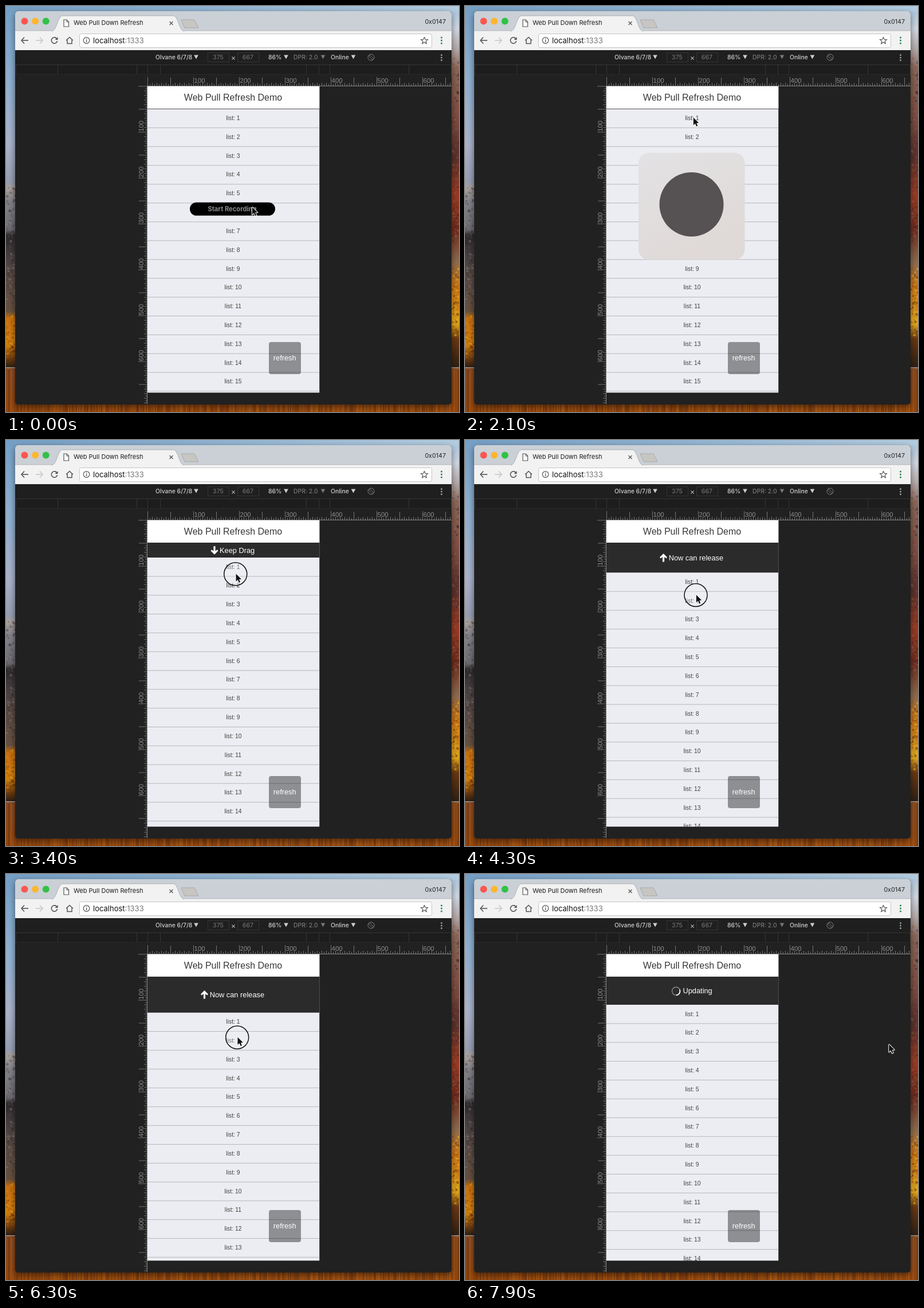
These frames come from a looping animation (791 px wide and 708 px high, 8 s). An HTML page with a canvas:

```html
<!DOCTYPE html>
<html lang="en">
<head>
<meta charset="utf-8">
<title>Web Pull Down Refresh</title>
<style>
html, body { margin: 0; width: 100%; height: 100%; overflow: hidden; background: #212121; }
canvas { display: block; width: 791px; height: 708px; }
</style>
</head>
<body>
<canvas id="stage" width="791" height="708"></canvas>
<script>
const W = 791, H = 708, LOOP = 8000, STEP = 100;
const PAGE = { x: 247, y: 139.5, w: 300.5, bottom: 674.5, list: 179.5, row: 32.82 };
const PRESS = 2600, RELEASE = 6700, REST = 48.5;
const UI = 'Inter, Roboto, sans-serif', SANS = '"Liberation Sans", Arial, sans-serif';

const view = document.getElementById('stage').getContext('2d');
const backdrop = document.createElement('canvas');
backdrop.width = W;
backdrop.height = H;
let g = backdrop.getContext('2d');

let seed = 7;
const rand = () => (seed = (seed * 16807) % 2147483647) / 2147483647;
const smooth = p => p * p * (3 - 2 * p);
const clamp = p => Math.max(0, Math.min(1, p));

function rect(x, y, w, h, fill) {
  g.fillStyle = fill;
  g.fillRect(x, y, w, h);
}

function round(x, y, w, h, r, fill, stroke) {
  g.beginPath();
  g.roundRect(x, y, w, h, r);
  if (fill) { g.fillStyle = fill; g.fill(); }
  if (stroke) { g.strokeStyle = stroke; g.lineWidth = 1; g.stroke(); }
}

function poly(points, fill, stroke, width = 1) {
  g.beginPath();
  points.forEach(([x, y]) => g.lineTo(x, y));
  if (fill) { g.closePath(); g.fillStyle = fill; g.fill(); }
  if (stroke) { g.strokeStyle = stroke; g.lineWidth = width; g.stroke(); }
}

function arc(x, y, r, fill, stroke, width = 1, from = 0, to = Math.PI * 2) {
  g.beginPath();
  g.arc(x, y, r, from, to);
  if (fill) { g.fillStyle = fill; g.fill(); }
  if (stroke) { g.strokeStyle = stroke; g.lineWidth = width; g.stroke(); }
}

function text(str, x, y, font, fill, align = 'left') {
  g.font = font;
  g.fillStyle = fill;
  g.textAlign = align;
  g.fillText(str, x, y);
}

function ramp(x, w, stops) {
  const grad = g.createLinearGradient(0, 0, 0, H);
  stops.forEach(([y, color]) => grad.addColorStop(y / H, color));
  rect(x, 0, w, H, grad);
}

function speckle(x, y, w, h, count, colors) {
  for (let i = 0; i < count; i++) {
    g.globalAlpha = 0.2 + rand() * 0.35;
    arc(x + rand() * w, y + rand() * h, 0.6 + rand() * 1.8, colors[Math.floor(rand() * colors.length)]);
  }
  g.globalAlpha = 1;
}

function desktop() {
  ramp(0, 400, [[0, '#759fc5'], [130, '#8fb0d0'], [240, '#a9b2ca'], [306, '#979eb2'], [318, '#a8a09c'],
    [340, '#85838a'], [390, '#6c6a70'], [400, '#2d282a'], [440, '#4a4142'], [475, '#5a4a44'], [532, '#66503f'],
    [545, '#c8700f'], [590, '#d0820f'], [615, '#6d3b10'], [629, '#2f2014'], [633, '#8b4a22'], [708, '#95480e']]);
  ramp(400, 391, [[0, '#a3c0da'], [40, '#d0d7e2'], [75, '#b5aaaa'], [110, '#8a6658'], [200, '#7a4a40'],
    [260, '#57302c'], [330, '#9a3a22'], [390, '#6f2c1e'], [445, '#8c6a4e'], [490, '#d07a18'],
    [555, '#dfa51c'], [580, '#6a3812'], [629, '#2f2014'], [633, '#94501f'], [708, '#9a4c10']]);
  const sky = g.createLinearGradient(0, 0, W, 0);
  sky.addColorStop(0, '#759fc5');
  sky.addColorStop(1, '#b3cce0');
  rect(0, 0, W, 10, sky);
  speckle(0, 315, 16, 215, 130, ['#2c2729', '#8d8986', '#4a4346']);
  speckle(0, 540, 16, 75, 90, ['#f0a812', '#b85008', '#6c3008']);
  speckle(779, 90, 12, 330, 160, ['#a54a2e', '#3c2222', '#8d6c5c']);
  speckle(779, 455, 12, 120, 110, ['#f3c224', '#b65208', '#5a280c']);
  rect(0, 630, W, 1.5, '#aaa09a');
  for (let x = 0; x < W; x += 2) {
    g.globalAlpha = rand() * 0.35;
    rect(x, 634, 1 + rand() * 2, 74, rand() < 0.6 ? '#4b2008' : '#d9781a');
  }
  g.globalAlpha = 1;
}

function dots(x, y, gap, color) {
  for (let i = -1; i < 2; i++) arc(x, y + i * gap, 1.5, color);
}

function arrowIcon(x, dir, color) {
  poly([[x - dir * 6, 60], [x + dir * 6, 60]], null, color, 1.6);
  poly([[x + dir, 54.5], [x + dir * 6, 60], [x + dir, 65.5]], null, color, 1.6);
}

function chrome() {
  g.save();
  g.shadowColor = 'rgba(0,0,0,.5)';
  g.shadowBlur = 12;
  g.shadowOffsetY = 4;
  round(16, 9, 762, 686, 5, '#212121');
  g.restore();
  round(16, 9, 762, 35, [5, 5, 0, 0], '#cad0d6');
  rect(16, 43, 762, 34, '#f2f2f2');
  rect(16, 42.5, 762, 1, '#b4b8bc');
  ['#fc5650', '#fdb62f', '#32c146'].forEach((c, i) => arc(32.5 + i * 18.6, 26.5, 6, c));

  g.beginPath();
  g.moveTo(80, 44);
  g.bezierCurveTo(89, 43, 90, 17, 99, 17);
  g.lineTo(292, 17);
  g.bezierCurveTo(301, 17, 302, 43, 311, 44);
  g.fillStyle = '#f2f2f2';
  g.fill();
  g.strokeStyle = '#aaaeb3';
  g.lineWidth = 1;
  g.stroke();
  rect(82, 43, 227, 2, '#f2f2f2');
  poly([[306, 24], [329, 24], [336, 38], [312, 38], [306, 24]], '#c8c6c3', '#a9a8a6');
  poly([[101, 24], [106, 24], [109.5, 27.5], [109.5, 36], [101, 36], [101, 24]], '#fff', '#555', 1.2);
  poly([[106, 24], [106, 28], [109.5, 28]], null, '#555');
  text('Web Pull Down Refresh', 118, 33, '11px ' + UI, '#1c1c1c');
  poly([[285.5, 27], [291.5, 33]], null, '#555', 1.3);
  poly([[291.5, 27], [285.5, 33]], null, '#555', 1.3);
  text('0x0147', 768, 30.5, '10.7px ' + UI, '#222', 'right');

  arrowIcon(33, -1, '#555');
  arrowIcon(58, 1, '#c8c8c8');
  arc(84.5, 60, 5.2, null, '#555', 1.6, 0.2, 5.5);
  poly([[90.5, 54], [90.5, 59], [85.5, 59]], '#555');
  poly([[105, 60], [111, 54.5], [117, 60]], null, '#555', 1.6);
  poly([[107, 59], [107, 65.5], [115, 65.5], [115, 59]], null, '#555', 1.5);
  round(128.5, 48.5, 615, 24, 3, '#fff', '#c5c5c5');
  arc(140.5, 60, 5.3, null, '#555', 1.2);
  rect(140, 59, 1.3, 4, '#555');
  rect(140, 56.7, 1.3, 1.3, '#555');
  text('localhost', 152, 64.5, '13px ' + UI, '#111');
  text(':1333', 152 + g.measureText('localhost').width, 64.5, '13px ' + UI, '#777');
  const star = [];
  for (let i = 0; i <= 10; i++) {
    const r = i % 2 ? 2.8 : 6.3, a = i * Math.PI / 5 - Math.PI / 2;
    star.push([730.5 + r * Math.cos(a), 60.5 + r * Math.sin(a)]);
  }
  poly(star, null, '#555', 1.2);
  dots(760.5, 60, 5, '#25854b');
}

function option(str, x, tip, color) {
  text(str, x, 93, '500 10.4px ' + UI, color);
  poly([[tip - 3.8, 85.5], [tip + 3.8, 85.5], [tip, 92.5]], color);
}

function deviceBar() {
  rect(16, 77, 762, 25, '#1f1f1f');
  option('Olvane 6/7/8', 261, 332, '#cfcfcf');
  option('86%', 458, 489, '#cfcfcf');
  option('DPR: 2.0', 502, 553.5, '#777');
  option('Online', 567, 606.5, '#cfcfcf');
  [[352, '375'], [404, '667']].forEach(([x, n]) => {
    g.strokeStyle = '#343434';
    g.lineWidth = 1;
    g.strokeRect(x + 0.5, 81.5, 37, 16);
    text(n, x + 18.5, 93, '10.7px ' + UI, '#777', 'center');
  });
  text('×', 397, 95, '13px ' + UI, '#bbb', 'center');
  arc(637.5, 89.5, 5.5, null, '#858585');
  poly([[635.5, 85.5], [641.5, 91.5], [639.5, 93.5], [633.5, 87.5], [635.5, 85.5]], null, '#858585', 0.8);
  dots(760.5, 90, 4.5, '#999');
  rect(16, 102, 762, 1, '#353535');
  rect(16, 103, 762, 16, '#1d1d1d');
  rect(16, 119, 762, 1, '#292929');
  [17, 90, 228, 247, 269, 524, 546, 565, 703, 777].forEach(x => rect(x, 103, 1, 16, '#343434'));
}

// Reports each tick's distance, height and label for either ruler.
function ticks(length, mark) {
  for (let i = 0; i * 4 < length; i++) {
    const tall = i % 20 === 0 ? 15 : i % 10 === 0 ? 14 : i % 2 ? 3 : 5;
    mark(i * 4, tall, i && i % 20 === 0 ? String(i * 5) : '');
  }
}

function rulers() {
  const tickColor = '#747474', label = '11.5px ' + SANS;
  ticks(531, (d, h, n) => {
    rect(247 + d, 139 - h, 1, h, tickColor);
    if (n) text(n, 248.5 + d, 133.5, label, '#8c8c8c');
  });
  ticks(554, (d, h, n) => {
    rect(246 - h, 139.5 + d, h, 1, tickColor);
    if (!n) return;
    g.save();
    g.translate(240, 139.5 + d);
    g.rotate(-Math.PI / 2);
    text(n, 0.5, 0, label, '#8c8c8c');
    g.restore();
  });
  rect(547, 139, 231, 1, '#858585');
  rect(246, 139, 1, 555, '#858585');
}

function track(points, t) {
  let i = points.findIndex(p => p[0] > t);
  if (i < 0) i = points.length;
  const a = points[i - 1], b = points[i] || a;
  const p = a === b ? 0 : smooth((t - a[0]) / (b[0] - a[0]));
  return [a[1] + (b[1] - a[1]) * p, a[2] + (b[2] - a[2]) * p];
}

const DROP_Y = 285;
const path = [[0, 429, 351], [400, 429, 351], [1600, 398, 195], [2100, 398, 195], [2500, 398.5, 197],
  [4300, 403, 270.5], [5200, 402.3, 239], [6300, 403.7, DROP_Y], [6700, 403.7, DROP_Y], [7600, 739.5, 297.5]];

const pullFrom = y => Math.max(0, (y - 198) * 0.715);

function pullAt(t, y) {
  if (t < PRESS) return 0;
  if (t < RELEASE) return pullFrom(y);
  const top = pullFrom(DROP_Y);
  return top + (REST - top) * smooth(clamp((t - RELEASE) / 300));
}

function blockArrow(x, y, dir) {
  g.save();
  g.translate(x, y);
  g.scale(1, dir);
  poly([[-1.6, -7], [1.6, -7], [1.6, 1.5], [4.8, -1], [6.5, 1], [0, 7.5], [-6.5, 1], [-4.8, -1], [-1.6, 1.5]], '#fff');
  g.restore();
}

function banner(t, pull) {
  const mid = PAGE.list + pull / 2, font = '12.8px ' + SANS, base = mid + 4.3;
  g.save();
  g.beginPath();
  g.rect(PAGE.x, 179, PAGE.w, pull + 0.5);
  g.clip();
  rect(PAGE.x, 179, PAGE.w, pull + 1, '#2b2b2b');
  if (t >= RELEASE) {
    const a = (t - 7900) / 1000 * Math.PI * 2;
    arc(368.5, mid + 0.5, 7, null, '#8a8a8a', 1.4);
    arc(368.5, mid + 0.5, 7, null, '#fff', 1.8, a - 0.4, a + 1.5);
    text('Updating', 380.5, base, font, '#fff');
  } else if (pull < REST) {
    blockArrow(364, mid, 1);
    text('Keep Drag', 373, base, font, '#fff');
  } else {
    blockArrow(346.5, mid, -1);
    text('Now can release', 355.7, base, font, '#fff');
  }
  g.restore();
}

function page(t, pull) {
  const { x, y, w, bottom, list, row } = PAGE;
  g.save();
  g.beginPath();
  g.rect(x, y, w, bottom - y);
  g.clip();
  rect(x, y, w, bottom - y, '#ecedf2');
  for (let i = 1; i < 17; i++) {
    const top = list + pull + (i - 1) * row;
    text('list: ' + i, 396.5, top + 19.5, '10.4px ' + SANS, '#424242', 'center');
    rect(x, top + row - 0.5, w, 1, '#b6b7bb');
  }
  rect(x, y, w, 39.5, '#fff');
  text('Web Pull Refresh Demo', 396.5, 164.5, '16px ' + SANS, '#383838', 'center');
  if (pull > 0.3) banner(t, pull);
  else rect(x, 179, w, 1, '#555');
  round(459, 586, 56, 56, 4, 'rgba(0,0,0,.4)');
  text('refresh', 486.7, 618.3, '12.8px ' + SANS, '#fff', 'center');
  g.restore();
}

function badge(t) {
  const alpha = Math.min(clamp((t - 1100) / 200), clamp((2500 - t) / 400));
  if (!alpha) return;
  g.globalAlpha = alpha;
  const fill = g.createLinearGradient(303, 256, 400, 442);
  fill.addColorStop(0, '#e3e2e4');
  fill.addColorStop(1, '#dfd9d7');
  round(303, 256, 185.5, 186.5, 18, fill);
  arc(395.5, 346, 56, '#565152');
  g.globalAlpha = 1;
}

function cursor(x, y) {
  g.save();
  g.translate(x, y);
  g.lineJoin = 'round';
  const arrow = [[0.5, 0], [0.5, 13.5], [3.6, 10.6], [5.8, 15.6], [8, 14.6], [5.9, 9.8], [10, 9.6], [0.5, 0]];
  poly(arrow, null, '#fff', 2);
  poly(arrow, '#111');
  g.restore();
}

function draw(t) {
  const [x, y] = track(path, t);
  g.drawImage(backdrop, 0, 0);
  page(t, pullAt(t, y));
  badge(t);
  if (t < 100) {
    round(321, 342.5, 149, 23, 11.5, '#000');
    text('Start Recording', 395, 357.5, '700 11.2px ' + UI, '#8a8a8a', 'center');
  }
  if (t >= PRESS && t < RELEASE) arc(x, y, 20, 'rgba(236,237,242,.3)', '#111', 1.5);
  cursor(x + 0.3, y - 0.5);
}

desktop();
chrome();
deviceBar();
rulers();
g = view;

const start = performance.now();
function tick() {
  const t = (performance.now() - start) % LOOP;
  draw(Math.floor(t / STEP) * STEP);
  requestAnimationFrame(tick);
}
tick();
</script>
</body>
</html>
```
